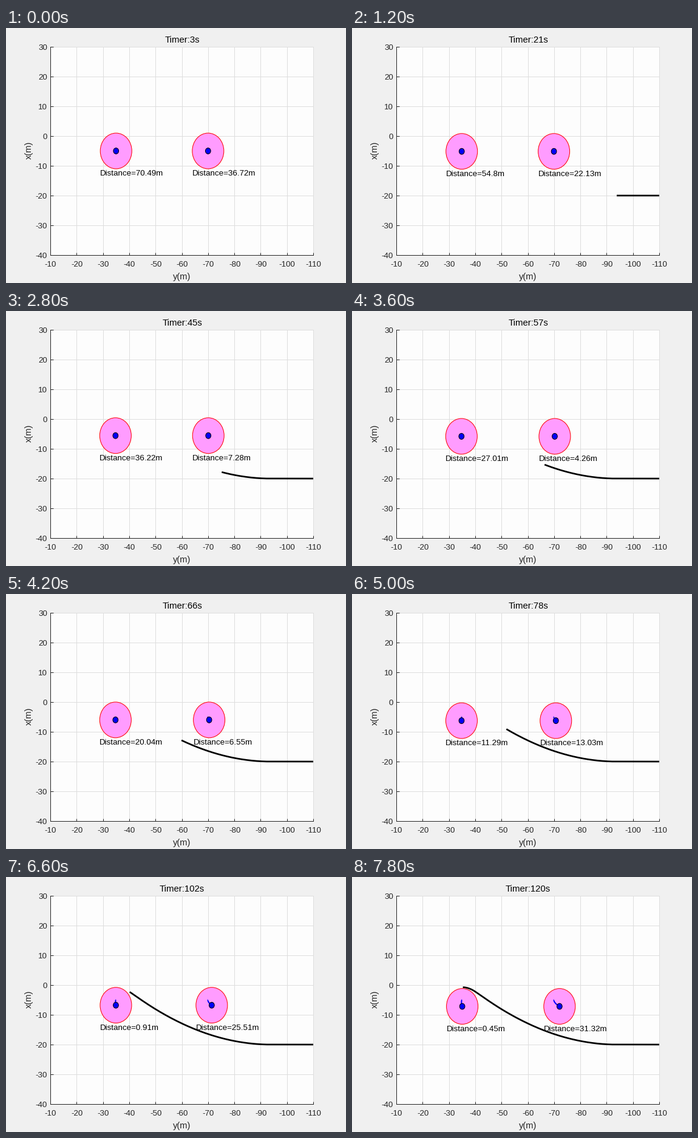
Recreate the animation shown at these times as a matplotlib script. Size 560 px wide and 420 px high, loop 8 s.

```python
import numpy as np
import matplotlib.pyplot as plt
from matplotlib.animation import FuncAnimation
from matplotlib.patches import Circle

W, H, DPI = 560, 420, 100
PX = 72 / DPI                                # points per pixel
LEFT, RIGHT, TOP, BOTTOM = 73, 506, 31, 374
FRAMES, STEP = 40, 200
RADIUS = 6
INK = "#262626"

plt.rcParams["font.family"] = "Liberation Sans"


def integrate(rate, end, n=4000):
    """Running integral of rate from 0 to end, as a callable."""
    s = np.linspace(0, end, n)
    mid = (s[1:] + s[:-1]) / 2
    total = np.concatenate([[0], np.cumsum(rate(mid)) * (s[1] - s[0])])
    return lambda x: np.interp(x, s, total)


# Positions in metres: y runs across, x runs up; time counts in frames.
def speed(t):
    """Settles to a cruise, then brakes evenly."""
    return np.minimum(2.11 + 0.87 * np.exp(-t / 7), 0.092 * (44.85 - t))


def slope(d):
    """Level flight, steady pull-up, straight climb, levelling off."""
    return np.clip(0.0123 * (d - 16), 0, np.minimum(0.61, 0.118 * (75 - d)))


advance = integrate(speed, FRAMES)
climb = integrate(slope, 75)


def sink(t):
    """Fall of both obstacles, easing in to a steady rate."""
    return -5 - 0.0655 * (t - 6 * (1 - np.exp(-t / 6)))


fig = plt.figure(figsize=(W / DPI, H / DPI), dpi=DPI, facecolor="#f0f0f0")
ax = fig.add_axes([LEFT / W, 1 - BOTTOM / H,
                   (RIGHT - LEFT) / W, (BOTTOM - TOP) / H],
                  facecolor="#fdfdfd")
ax.set(xlim=(-10, -110), ylim=(-40, 30),
       xticks=range(-10, -111, -10), yticks=range(-40, 31, 10))
ax.set_axisbelow(True)
ax.grid(color="#dedede", lw=PX, clip_on=False)
ax.tick_params(direction="in", length=4.5 * PX, width=PX, color=INK,
               labelbottom=False, labelleft=False)
for side, spine in ax.spines.items():
    spine.set(color=INK, lw=PX, visible=side in ("left", "bottom"))


def put(x, y, text, size, color=INK, ha="center", **kw):
    return fig.text(x / W, 1 - y / H, text, size=size * PX, color=color,
                    ha=ha, va="baseline", **kw)


for n in range(11):
    put(LEFT + 0.5 + n * (RIGHT - LEFT) / 10, 393, str(-10 - 10 * n), 13.33)
for n in range(8):
    put(68, TOP + 5.2 + n * (BOTTOM - TOP) / 7, str(30 - 10 * n), 13.33,
        ha="right")
put(290, 414, "y(m)", 14.67)
put(42, 201.5, "x(m)", 14.67, rotation=90, rotation_mode="anchor")
title = put(290, 24, "", 14.9, "black")


class Obstacle:
    def __init__(self, start, drift, bend):
        self.start, self.drift, self.bend = start, drift, bend
        self.zone = ax.add_patch(Circle((0, 0), RADIUS, fc="#ff9cff",
                                        ec="red", lw=PX, zorder=3))
        self.dot = ax.add_patch(Circle((0, 0), 1, fc="blue", ec="black",
                                       lw=PX, zorder=5))
        self.trail, = ax.plot([], [], color="blue", lw=2 * PX, zorder=4,
                              solid_capstyle="butt")
        self.label = ax.text(0, 0, "", size=13.33 * PX, color="black",
                             ha="left", va="baseline", zorder=8)

    def move(self, i, tip):
        t = np.linspace(0, i, 2 * i + 2)
        y = self.start + self.drift * t - self.bend * t ** 2
        x = sink(t)
        self.trail.set_data(y, x)
        here = y[-1], x[-1]
        self.zone.center = self.dot.center = here
        gap = np.hypot(here[0] - tip[0], here[1] - tip[1]) - RADIUS
        self.label.set_text(f"Distance={round(float(gap), 2):g}m")
        self.label.set_position((here[0] + 6.05, here[1] - 8.3))


obstacles = [Obstacle(-35, 0.0245, 0.00068), Obstacle(-70, 0.0191, 0.00186)]
route, = ax.plot([], [], color="black", lw=2.67 * PX, zorder=6,
                 solid_capstyle="butt")


def draw(i):
    d = np.linspace(0, advance(i), 160)
    y, x = d - 110, climb(d) - 20
    route.set_data(y, x)
    route.set_visible(i > 0)
    for ob in obstacles:
        ob.move(i, (y[-1], x[-1]))
    title.set_text(f"Timer:{3 + 3 * i}s")
    return []


anim = FuncAnimation(fig, draw, frames=FRAMES, interval=STEP, repeat=True,
                     repeat_delay=0, init_func=lambda: draw(0))
plt.show()
```
